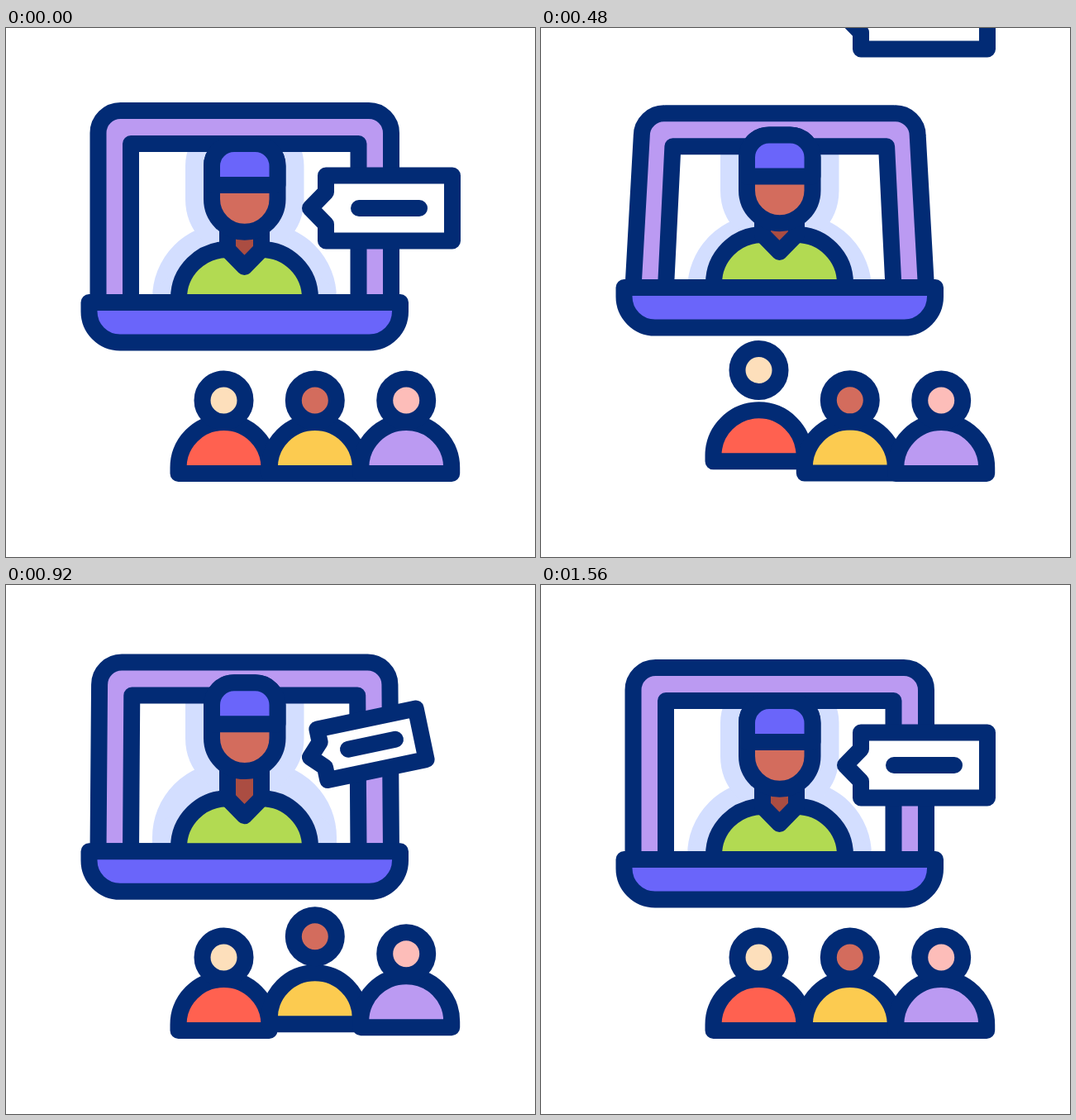
An HTML page for the animation above (1.68 s loop, 640x640 px).

```html
<!DOCTYPE html>
<html lang="en">
<head>
<meta charset="utf-8">
<title>Online class</title>
<style>
  html, body { margin: 0; width: 100%; height: 100%; overflow: hidden; background: #fff; }
  svg { display: block; width: 100%; height: 100%; }
  .ink { stroke: #022b75; stroke-width: 20; stroke-linecap: round; stroke-linejoin: round; }
  .halo { fill: #d3deff; stroke: #d3deff; stroke-width: 64; stroke-linejoin: round; }
</style>
</head>
<body>
<svg viewBox="0 0 640 640">
  <defs>
    <path id="torso" d="M209 332V327a59 59 0 0 1 59-59H309a59 59 0 0 1 59 59V332"/>
    <path id="skull" d="M249 167a27 27 0 0 1 27-27H301.5a27 27 0 0 1 27 27V207a39.75 39.75 0 0 1-79.5 0Z"/>
    <clipPath id="view"><path class="glass"/></clipPath>
  </defs>
  <g id="laptop">
    <path id="lid" class="ink" fill="#bb9af2"/>
    <path class="glass" fill="#fff"/>
    <g clip-path="url(#view)">
      <g class="halo head">
        <use href="#torso"/>
        <use href="#skull"/>
        <path d="M209 332H368V372H209Z"/>
      </g>
    </g>
    <path class="glass ink" fill="none"/>
    <use href="#torso" class="ink" fill="#b2da52"/>
    <path class="ink" fill="#ab4d42" d="M268 215V268L288.5 289L309 268V215Z"/>
    <g class="ink head">
      <use href="#skull" fill="#d36c5d"/>
      <path fill="#6a65fa" d="M249 190V167a27 27 0 0 1 27-27H301.5a27 27 0 0 1 27 27V190Z"/>
    </g>
    <path class="ink" fill="#6a65fa" d="M100.5 332H477V343a37.5 37.5 0 0 1-37.5 37.5H138a37.5 37.5 0 0 1-37.5-37.5Z"/>
  </g>
  <g id="crowd" class="ink"></g>
  <g id="bubble" class="ink">
    <path id="frame" fill="#fff"/>
    <path id="dash" fill="none"/>
  </g>
</svg>
<script>
const LOOP = 1680, STEP = 40;
const $ = id => document.getElementById(id);
const all = sel => document.querySelectorAll(sel);
const move = (el, y) => el.setAttribute('transform', `translate(0 ${y.toFixed(2)})`);

// Value at time t along [time, value] keys, eased by a sine between them.
function track(t, keys) {
  if (t <= keys[0][0]) return keys[0][1];
  for (let i = 1; i < keys.length; i++) {
    const [a, from] = keys[i - 1], [b, to] = keys[i];
    if (t < b) return from + (to - from) * (1 - Math.cos(Math.PI * (t - a) / (b - a))) / 2;
  }
  return keys[keys.length - 1][1];
}

const TILT = [[80, 0], [600, 24.3], [1020, 0]];
const LIFT = [[265, 0], [625, -27.5], [1120, 0]];
const NOD = [[220, 0], [460, 7.5], [820, -16], [1120, 0]];
const SPIN = [[630, 30], [980, -15], [1240, 0]];
const HOP_BODY = [[0, 0], [280, -15.6], [660, 0]];
const HOP_HEAD = [[15, 0], [365, -37], [640, 0]];

const people = [
  { x: 263.5, start: 140, skin: '#fddfbb', shirt: '#ff6150' },
  { x: 373.8, start: 450, skin: '#d36c5d', shirt: '#fccb50' },
  { x: 484.2, start: 827, skin: '#fdbdb9', shirt: '#bb9af2' }
];

$('crowd').innerHTML = people.map(p => `
  <path fill="${p.shirt}" d="M${p.x - 55} 539V532a55 55 0 0 1 110 0V539Z"/>
  <circle fill="${p.skin}" cx="${p.x}" cy="450.5" r="26"/>`).join('');
people.forEach((p, i) => [p.body, p.head] = [...$('crowd').children].slice(2 * i));

function drawLaptop(t) {
  const drop = track(t, TILT), inset = drop * 0.55;
  const side = inset * 0.88, inner = inset * 0.72;
  move($('laptop'), track(t, LIFT));
  $('lid').setAttribute('d',
    `M111.5 332L${111.5 + side} ${127 + drop}A27 27 0 0 1 ${138.5 + inset} ${100 + drop}` +
    `H${439 - inset}A27 27 0 0 1 ${466 - side} ${127 + drop}L466 332Z`);
  const glass = `M151 332L${151 + inner} ${140 + drop}H${426.5 - inner}L426.5 332Z`;
  all('.glass').forEach(el => el.setAttribute('d', glass));
  all('.head').forEach(el => move(el, track(t, NOD)));
}

// The bubble grows and turns around its tip; its line weight stays the same.
function drawBubble(t) {
  const leaving = t < 630;
  const rise = Math.max(0, (t - 80) / 400);
  const left = Math.min(1, Math.max(0, (1060 - t) / 405));
  const size = leaving ? 1 : 1 - left ** 1.5;
  const angle = leaving ? 0 : track(t, SPIN) * Math.PI / 180;
  const y0 = 218 + (leaving ? -232 * rise ** 2.08 : track(t, LIFT));
  const c = Math.cos(angle) * size, s = Math.sin(angle) * size;
  const line = pts => 'M' + pts.map(([x, y]) =>
    `${(368 + x * c - y * s).toFixed(2)} ${(y0 + x * s + y * c).toFixed(2)}`).join('L');
  $('bubble').style.display = size > 0 ? '' : 'none';
  $('frame').setAttribute('d', line([
    [0, 0], [19, -19.5], [19, -39.5], [172, -39.5], [172, 39.5], [19, 39.5], [19, 19.5]
  ]) + 'Z');
  $('dash').setAttribute('d', line([[59, 0], [132, 0]]));
}

function draw(t) {
  drawLaptop(t);
  drawBubble(t);
  for (const p of people) {
    move(p.body, track(t - p.start, HOP_BODY));
    move(p.head, track(t - p.start, HOP_HEAD));
  }
}

const begin = performance.now();
function tick() {
  const t = (performance.now() - begin) % LOOP;
  draw(Math.floor((t + 4) / STEP) * STEP % LOOP);
  requestAnimationFrame(tick);
}
tick();
</script>
</body>
</html>
```
